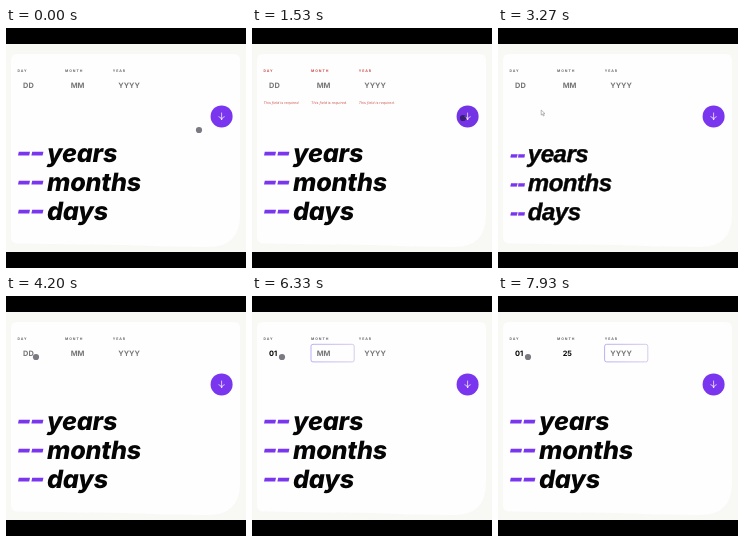
Recreate the animation shown at these times as an HTML page. Size 240x240 px, loop 8 s.

```html
<!DOCTYPE html>
<html lang="en">
<head>
<meta charset="utf-8">
<title>Age calculator</title>
<style>
  html, body { margin: 0; width: 100%; height: 100%; overflow: hidden; background: #000; }
  svg { display: block; width: 100vw; height: 100vh; }
  text { font-family: Inter, sans-serif; text-rendering: geometricPrecision; white-space: pre; }
  .label { font-size: 3.5px; font-weight: 700; letter-spacing: .9px; }
  .value { font-size: 7.4px; font-weight: 700; }
  .error { font-size: 3.65px; font-style: italic; fill: #cf5a52; }
  .result { font-weight: 800; font-style: italic; }
  #loaded text { font-size: 25.2px; letter-spacing: -.2px; font-feature-settings: "cv11"; }
  #fallback text { font-family: "Liberation Sans", Arial, sans-serif; font-size: 24px; letter-spacing: -.02em; stroke-width: .4px; }
</style>
</head>
<body>
<svg id="stage" viewBox="0 0 240 240">
  <defs>
    <linearGradient id="ring">
      <stop offset="0" stop-color="#a99af2"/>
      <stop offset="1" stop-color="#cdbdea"/>
    </linearGradient>
  </defs>
  <rect y="16" width="240" height="208" fill="#f8f8f5"/>
  <path d="M11 26H228Q234 26 234 32V187Q234 219 202 219Q160 219 120 217L11 215.5Q5 215.5 5 209V32Q5 26 11 26Z" fill="#fefefe"/>
  <g id="fields"></g>
  <circle id="button" cx="215.6" cy="88.4" r="11"/>
  <path d="M215.6 84.6V92M212.5 88.6Q215.3 89.3 215.6 91.8Q215.9 89.3 218.7 88.6" fill="none" stroke="#fff" stroke-width=".7"/>
  <g id="loaded" class="result"></g>
  <g id="fallback" class="result"></g>
  <circle id="dot" r="3.1" fill="#0c0a18" fill-opacity=".54"/>
  <path id="arrow" d="M43.2 82V87.1L44.4 86L45.3 88L46.2 87.6L45.3 85.7H47Z" fill="#fff" stroke="#777" stroke-width=".5"/>
</svg>
<script>
const LOOP = 8000, PURPLE = "#7a36ee", BLACK = "#050505";
const RELOAD = 3130, LOADED = 3400;
const $ = id => document.getElementById(id);

function add(parent, tag, attrs, text = "") {
  const el = document.createElementNS("http://www.w3.org/2000/svg", tag);
  for (const key in attrs) el.setAttribute(key, attrs[key]);
  el.textContent = text;
  parent.append(el);
  return el;
}

// typed: [time, value] pairs; focus: [start, end]
const fields = [
  { name: "DAY", hint: "DD", x: 11.5, focus: [4350, 5300], typed: [[4750, "0"], [4950, "01"]] },
  { name: "MONTH", hint: "MM", x: 59.1, focus: [5300, 7650], typed: [[6900, "2"], [7270, "25"]] },
  { name: "YEAR", hint: "YYYY", x: 106.7, focus: [7650, LOOP], typed: [] }
];

for (const f of fields) {
  const g = $("fields");
  f.label = add(g, "text", { class: "label", x: f.x, y: 44.4 }, f.name);
  f.box = add(g, "rect", { x: f.x - .1, y: 48.3, width: 43.2, height: 17.6, rx: 2, fill: "none", stroke: "url(#ring)", "stroke-width": .8 });
  f.value = add(g, "text", { class: "value", x: f.x + 5.6, y: 60 });
  f.error = add(g, "text", { class: "error", x: f.x, y: 76 }, "This field is required.");
}

["years", "months", "days"].forEach((unit, i) => {
  const y = 134 + i * 29;
  for (const x of [12, 25.4])
    add($("loaded"), "path", { d: `M${x + .8} ${y - 10.3}h11.2l-.8 3.7h-11.2z`, fill: PURPLE });
  add($("loaded"), "text", { x: 41, y, fill: BLACK }, unit);
  add($("fallback"), "text", { x: 11.9, y, fill: PURPLE, stroke: PURPLE }, "--");
  add($("fallback"), "text", { x: 29.8, y, fill: BLACK, stroke: BLACK }, unit);
});

// pointer stops: time, x, y
const stops = [
  [0, 193, 102], [550, 211, 90], [1850, 211, 90],
  [2850, 44, 85], [3400, 44, 85], [3850, 30, 61], [LOOP, 30, 61]
];

function pointer(t) {
  const i = stops.findIndex((s, n) => n && t <= s[0]);
  const [t0, x0, y0] = stops[i - 1], [t1, x1, y1] = stops[i];
  const p = (t - t0) / (t1 - t0), e = p * p * (3 - 2 * p);
  return [x0 + (x1 - x0) * e, y0 + (y1 - y0) * e];
}

const show = (el, on) => el.setAttribute("visibility", on ? "visible" : "hidden");

function draw(t) {
  const invalid = t >= 950 && t < RELOAD;
  const loading = t >= RELOAD && t < LOADED;
  for (const f of fields) {
    const typed = f.typed.filter(k => k[0] <= t).pop();
    f.value.textContent = typed ? typed[1] : f.hint;
    f.value.setAttribute("fill", typed ? BLACK : "#777");
    f.label.setAttribute("fill", invalid ? "#cc4a48" : "#68666c");
    show(f.error, invalid);
    show(f.box, t >= f.focus[0] && t < f.focus[1]);
  }
  show($("loaded"), !loading);
  show($("fallback"), loading);
  show($("arrow"), loading);
  show($("dot"), !loading);

  const [x, y] = pointer(t);
  $("dot").setAttribute("cx", x);
  $("dot").setAttribute("cy", y);
  const hover = Math.hypot(x - 215.6, y - 88.4) < 11;
  $("button").setAttribute("fill", hover ? "#7433e4" : PURPLE);
}

const start = performance.now();
function tick() {
  draw((performance.now() - start) % LOOP);
  requestAnimationFrame(tick);
}
tick();
</script>
</body>
</html>
```
